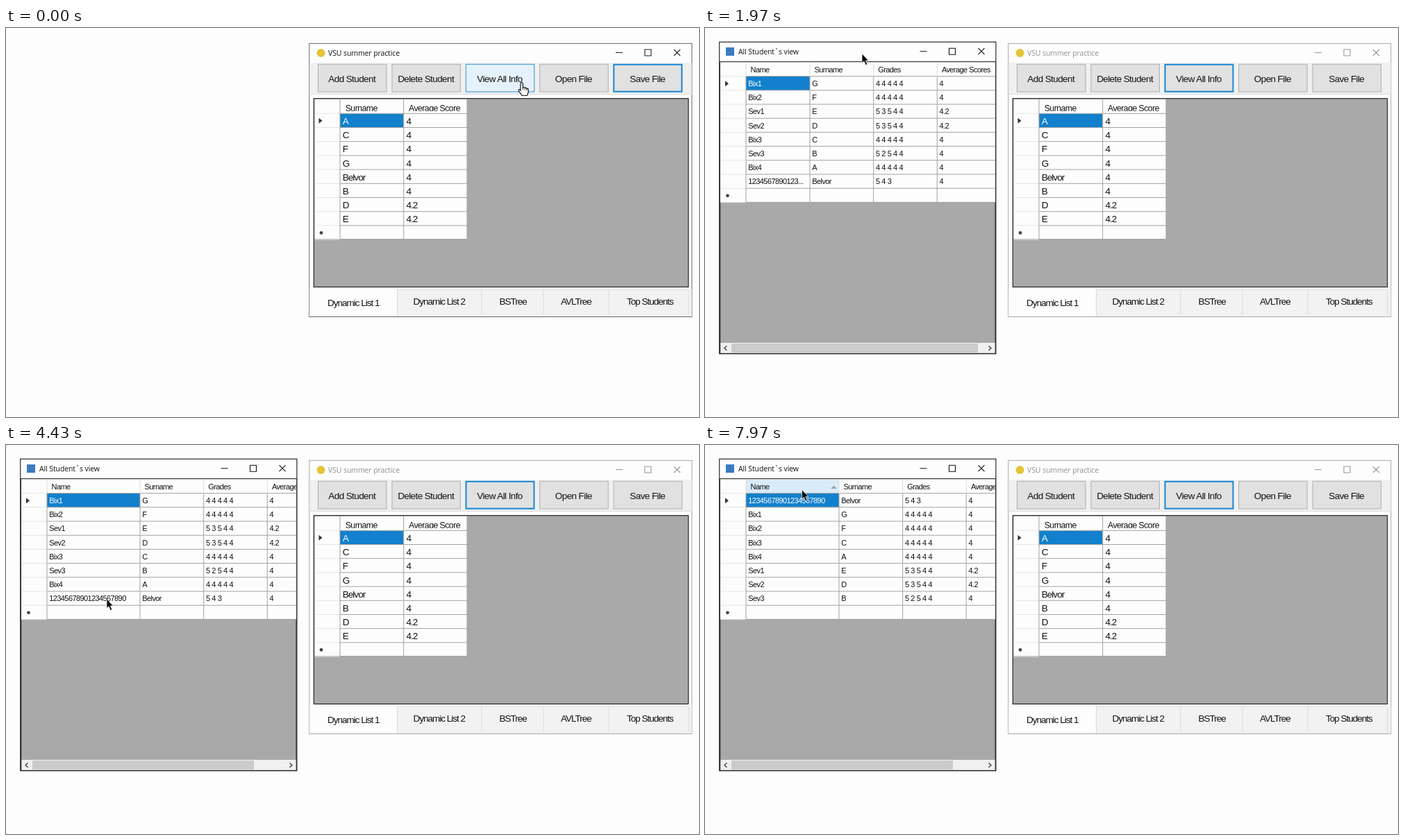
These frames come from a looping animation (998 by 561 pixels, 8000 ms). An HTML page:

```html
<!DOCTYPE html>
<html lang="en">
<head>
<meta charset="utf-8">
<title>Student tables</title>
<style>
html, body { margin: 0; width: 100%; height: 100%; overflow: hidden; background: #fdfdfd; }
svg { display: block; width: 998px; height: 561px; }
text { font-family: "Liberation Sans", Arial, sans-serif; fill: #111; white-space: pre; }
.title { font: 10.5px "Open Sans", "Noto Sans", sans-serif; letter-spacing: -.1px; }
.button { font-size: 13.5px; letter-spacing: -.6px; text-anchor: middle; }
.tab { font-size: 13.5px; letter-spacing: -1px; }
.cell { font-size: 13.5px; letter-spacing: -.95px; }
.head { font-size: 12.3px; letter-spacing: -.55px; }
.small { font-size: 11px; letter-spacing: -.6px; word-spacing: .4px; }
</style>
</head>
<body>
<svg id="stage" viewBox="0 0 998 561">
  <defs><clipPath id="inside"><rect x="22" y="49" width="396" height="405"/></clipPath></defs>
  <g id="main"></g>
  <g id="popup"></g>
  <g id="cursor"></g>
</svg>
<script>
const LOOP = 8000, OPEN = 300, RESIZED = 3240, SORTED = 7640;
const BLUE = '#1280cc', GRAY = '#a9a9a9', LINE = '#a2a2a0', PALE = '#e6e6e3', ROW = 20.2;

const students = [
  ['Bix1', 'G', '4 4 4 4 4'], ['Bix2', 'F', '4 4 4 4 4'],
  ['Sev1', 'E', '5 3 5 4 4'], ['Sev2', 'D', '5 3 5 4 4'],
  ['Bix3', 'C', '4 4 4 4 4'], ['Sev3', 'B', '5 2 5 4 4'],
  ['Bix4', 'A', '4 4 4 4 4'], ['12345678901234567890', 'Belvor', '5 4 3']
].map(([name, surname, grades]) => {
  const marks = grades.split(' ').map(Number);
  const mean = marks.reduce((a, b) => a + b) / marks.length;
  return [name, surname, grades, String(mean)];
});
const byName = [...students].sort((a, b) => a[0] < b[0] ? -1 : 1);
const scoreOrder = ['A', 'C', 'F', 'G', 'Belvor', 'B', 'D', 'E'];

// Each key is [time, x, y]
const pointerPath = [
  [0, 743, 79], [360, 743, 79], [800, 373, -12], [890, 373, -12], [1360, 108, 21],
  [1400, 110, 22], [1650, 226, 37], [2060, 226, 37], [2500, 151, 69], [2620, 151, 69],
  [3120, 193, 69], [3560, 193, 69], [4150, 140, 222], [4430, 145, 222], [4900, 172, 225],
  [5300, 172, 225], [5900, 403, 69], [6250, 403, 69], [6900, 230, 62], [7400, 139.5, 64.5]
];
const windowPath = [
  [0, 147, -47], [890, 147, -47], [1360, -118, -13.5], [1400, -116, -12.6], [1650, 0, 0]
];

function along(path, t) {
  const i = path.findIndex(k => k[0] > t);
  if (i < 0) return path[path.length - 1].slice(1);
  const a = path[i - 1], b = path[i];
  const p = (t - a[0]) / (b[0] - a[0]), e = p * p * (3 - 2 * p);
  return [a[1] + (b[1] - a[1]) * e, a[2] + (b[2] - a[2]) * e];
}

const box = (x, y, w, h, fill, stroke = 'none', sw = 1) =>
  `<rect x="${x}" y="${y}" width="${w}" height="${h}" fill="${fill}" stroke="${stroke}" stroke-width="${sw}"/>`;
const label = (x, y, s, cls, fill = '#111') =>
  `<text x="${x}" y="${y}" class="${cls}" style="fill:${fill}">${s}</text>`;
const path = (d, stroke, sw = 1, fill = 'none') =>
  `<path d="${d}" fill="${fill}" stroke="${stroke}" stroke-width="${sw}"/>`;

const windowButtons = (x, y, color) =>
  path(`M${x} ${y}h10M${x + 42} ${y - 4.5}h9v9h-9zM${x + 84} ${y - 4.5}l9 9m0-9l-9 9`, color, 1.1);

// Row header marks: current row and new row
const marks = (x, y, rows) =>
  path(`M${x} ${y - 4}l5 4l-5 4z`, 'none', 0, '#333') +
  `<circle cx="${x + 3.5}" cy="${y + rows * ROW}" r="2.4" fill="#444"/>`;

function rules(left, first, right, top, rows) {
  let d = '', pale = '';
  for (let i = 0; i <= rows; i++) {
    const y = (top + i * ROW).toFixed(1);
    d += `M${first} ${y}H${right}`;
    pale += `M${left} ${y}H${first}`;
  }
  return path(pale, PALE) + path(d, LINE);
}

function drawMain(active, press, focus) {
  const ink = active ? '#111' : '#8f8f8f';
  let s = box(436.8, 22.3, 551, 394.2, '#fdfdfd', active ? '#666' : '#a8a8a8') +
    box(437.5, 50, 550, 45.5, '#f0f0f1') +
    `<circle cx="453.5" cy="36" r="6" fill="#e3c43a"/>` +
    label(464, 40, 'VSU summer practice', 'title', ink) +
    windowButtons(878, 35.5, active ? '#222' : '#999') +
    path('M437 95.5H988', '#dcdcdc');

  ['Add Student', 'Delete Student', 'View All Info', 'Open File', 'Save File'].forEach((name, i) => {
    const x = 449.5 + i * 106.4, hot = i === 2 && press >= 0, on = i === focus;
    const fill = hot ? (press ? '#cce4f7' : '#e5f1fb') : '#e1e1e1';
    s += on ? box(x + .2, 52.7, 98, 39, fill, '#1585d3', 2)
            : box(x, 52.3, 98.5, 39.7, fill, hot ? '#3291d2' : '#adadad');
    s += label(x + 48.7, 77.5, name, 'button');
  });

  s += box(443.3, 101.7, 539.4, 271.8, GRAY, '#222', 1.2) +
    box(444.5, 102.8, 219.5, 201.2, '#fdfdfd') +
    label(488.7, 120.3, 'Surname', 'head') + label(580, 120.3, 'Average Score', 'head') +
    box(481, 119.8, 183, 3.7, '#fdfdfd') +
    box(481, 123.8, 91.5, 19.8, BLUE) +
    rules(444.5, 481, 664, 123.3, 9) +
    path('M481 103V304M572.7 103V304M664 103V304', LINE);
  scoreOrder.forEach((surname, i) => {
    const y = 139 + i * ROW, row = students.find(r => r[1] === surname);
    s += label(484.7, y, surname, 'cell', i ? '#111' : '#fff') + label(576.5, y, row[3], 'cell');
  });
  s += marks(450.5, 133.8, 8);

  s += box(437.5, 376.5, 550, 39.5, '#f2f2f2') + box(437.5, 375, 126, 41, '#fdfdfd') +
    path('M564 377H983', '#e2e2e2') +
    path('M563.5 377V416M685 378V414M774 378V414M868 378V414M983 378V414', '#dadada');
  [[463, 'Dynamic List 1'], [586.5, 'Dynamic List 2'], [710.5, 'BSTree'], [799, 'AVLTree'], [894, 'Top Students']]
    .forEach(([x, name], i) => s += label(x, i ? 399.3 : 401.2, name, 'tab'));
  return s;
}

function drawPopup(edges, hover, sorted, guide) {
  const wide = edges[1] > 151, rows = sorted ? byName : students;
  let s = box(20.7, 20.2, 398.2, 449.6, '#fdfdfd', '#2a2a2a', 1.2) +
    box(30, 28, 12, 12, '#3c7bc0') +
    label(48, 37.8, 'All Student`s view', 'title') +
    windowButtons(309.5, 33.7, '#111') +
    box(21.7, 48.7, 396.4, 420.6, GRAY, '#222', 1.2);

  s += '<g clip-path="url(#inside)">' + box(22, 49.3, 398, 201.7, '#fdfdfd');
  if (hover >= 0) s += box(edges[hover], 50, edges[hover + 1] - edges[hover], 20, '#d9ebf8');
  s += box(edges[0], 70, edges[1] - edges[0], 19.8, BLUE) + rules(22, 59, 430, 69.6, 9);
  edges.forEach(x => s += path(`M${x} 70V251`, LINE) + path(`M${x} 50V70`, '#dcdcda'));
  ['Name', 'Surname', 'Grades', 'Average Scores'].forEach((h, i) =>
    s += label(edges[i] + 6.6, 63.7, h, 'small'));
  rows.forEach((row, r) => row.forEach((v, c) => {
    const text = !wide && v.length > 16 ? v.slice(0, 13) + '...' : v;
    s += label(edges[c] + 3.3, 84 + r * ROW, text, 'small', r + c ? '#111' : '#fff');
  }));
  s += marks(29, 80.2, 8);
  if (sorted) s += path('M181 63l4.5-4.5l4.5 4.5z', 'none', 0, '#9aa5ad');
  if (guide) s += `<path d="M${guide} 50V454" stroke="#444" stroke-width="2" stroke-dasharray="1 1"/>`;
  s += '</g>';

  return s + box(22.5, 454, 395, 14.8, '#f0f0f0') + box(38, 455, wide ? 319 : 355, 13.5, '#cbcbcb') +
    path('M31.5 458.5l-3.5 3.3l3.5 3.3M408.5 458.5l3.5 3.3l-3.5 3.3', '#444', 1.4);
}

const arrows = 'M-8 0l4-3.5v3h8v-3l4 3.5l-4 3.5v-3h-8v3z';
const doubleArrow = path(arrows, '#fff', 1.6, '#111') + path(arrows, 'none', 0, '#111');
const cursors = {
  arrow: path('M0 0V13.5L3 10.8L5.4 16.5L7.8 15.5L5.5 10H9.5Z', '#fff', .7, '#0a0a0a'),
  hand: path('M-2 1.5Q-2-.3-.3-.3Q1.3-.3 1.4 1.5V7Q4 5.8 4.3 7.5Q6.6 6.6 6.9 8.4Q9.2 7.8 9.2 10.2V14L7.3 18.5H.2L-4.2 12.4Q-5.6 10-4 9.5Q-3 9.3-2 11Z', '#111', 1.2, '#fff') +
    path('M1.4 7v3M4.3 7.5v3M6.9 8.4v2.5', '#111', .9),
  column: doubleArrow,
  row: `<g transform="rotate(90)">${doubleArrow}</g>`
};

const shown = {};
function put(id, html) {
  if (shown[id] === html) return;
  shown[id] = html;
  document.getElementById(id).innerHTML = html;
}

function render(t) {
  const open = t >= OPEN;
  const [x, y] = along(pointerPath, t), [dx, dy] = along(windowPath, t);
  const shift = t >= RESIZED ? 42 : 0;
  const edges = [59, 151 + shift, 242.7 + shift, 334.3 + shift, 426 + shift];
  const dragging = t > 2620 && t < RESIZED;

  let hover = -1, kind = open ? 'arrow' : 'hand';
  if (t > 1700 && y > 50 && y < 70) {
    hover = edges.findIndex((e, i) => x >= e && x < edges[i + 1]);
    if (dragging || edges.some(e => Math.abs(x - e) < 4)) kind = 'column';
    else if (y > 67.5) kind = 'row';
  }

  const press = open ? -1 : t > 180 ? 1 : 0;
  put('main', drawMain(!open, press, t > 180 ? 2 : 4));
  put('popup', open ? `<g transform="translate(${dx.toFixed(1)} ${dy.toFixed(1)})">` +
    drawPopup(edges, hover, t >= SORTED, dragging ? x.toFixed(1) : 0) + '</g>' : '');
  put('cursor', `<g transform="translate(${x.toFixed(1)} ${y.toFixed(1)})">${cursors[kind]}</g>`);
}

const start = performance.now();
function tick() {
  render((performance.now() - start) % LOOP);
  requestAnimationFrame(tick);
}
tick();
</script>
</body>
</html>
```
